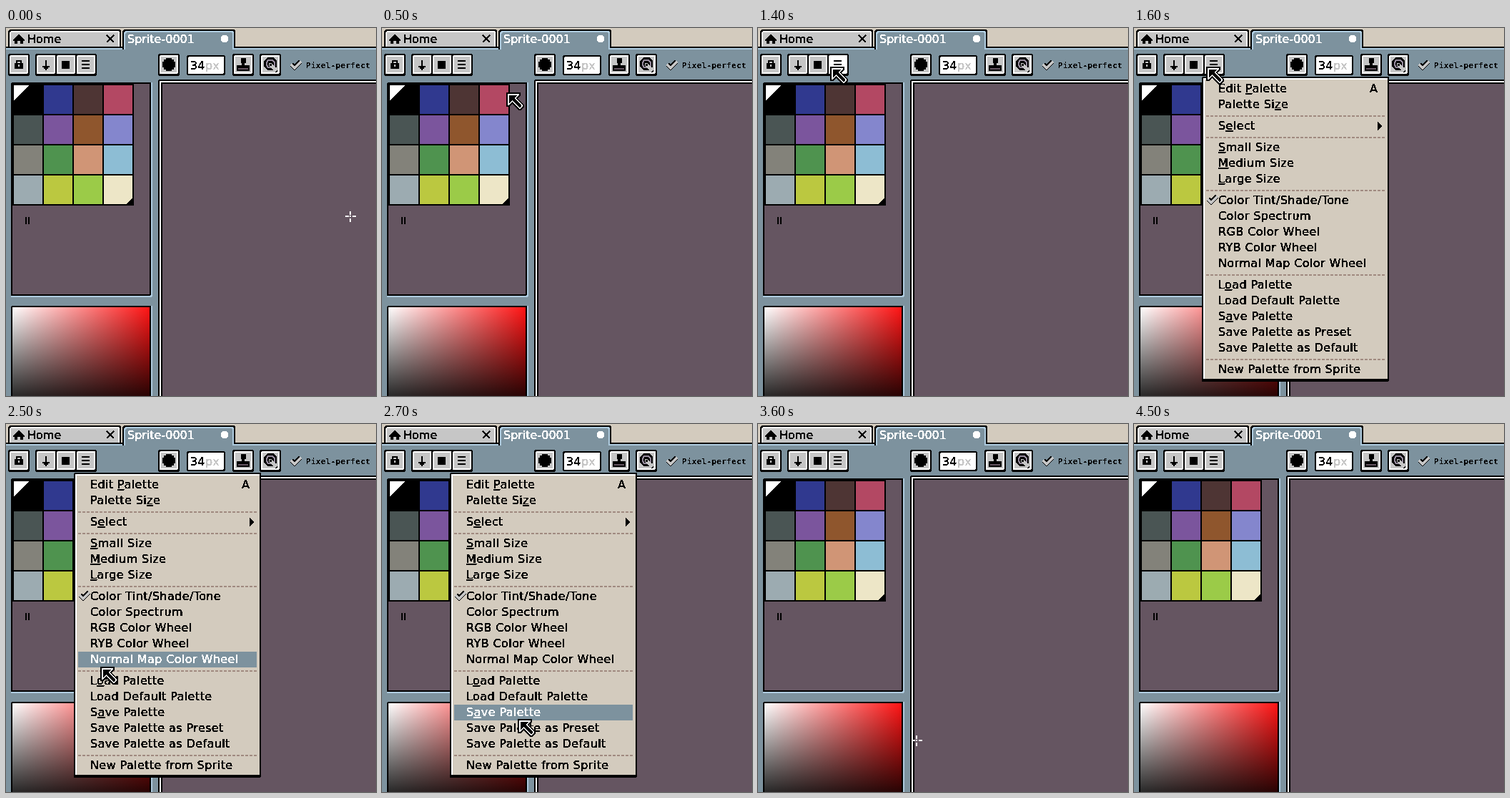
An HTML page that plays this animation: 518x514 px, repeating every 4900 ms.

```html
<!DOCTYPE html>
<html lang="en">
<head>
<meta charset="utf-8">
<title>Palette menu</title>
<style>
  html, body { margin: 0; width: 100%; height: 100%; overflow: hidden; background: #7d929e; }
  svg { display: block; width: 518px; height: 514px; shape-rendering: crispEdges; cursor: none; }
  text { font: 16px "DejaVu Sans", sans-serif; fill: #000; stroke: #000; stroke-width: .4px;
    white-space: pre; filter: url(#crisp); }
  .light { fill: #fff; stroke: #fff; }
  .dim { fill: #c6c6c6; stroke: #c6c6c6; }
  .row text { letter-spacing: .4px; }
  .row.on text { fill: #fff; stroke: #fff; }
  .row .bar { fill: none; }
  .row.on .bar { fill: #7d929e; }
  .u { text-decoration: underline; text-decoration-thickness: 2px; text-underline-offset: 2px; }
  .small { font: bold 11px "DejaVu Sans Mono", monospace; letter-spacing: .3px; stroke: none; }
  .face { fill: #c6c6c6; }
  .hover .face { fill: #fff; }
</style>
</head>
<body>
<svg viewBox="0 0 518 514">
  <defs>
    <linearGradient id="hue"><stop stop-color="#fff"/><stop offset="1" stop-color="#ff1414"/></linearGradient>
    <linearGradient id="shade" x2="0" y2="1"><stop stop-opacity="0"/><stop offset="1" stop-opacity=".88"/></linearGradient>
    <!-- hard, unsmoothed letter edges -->
    <filter id="crisp" x="-5%" y="-20%" width="110%" height="150%" color-interpolation-filters="sRGB">
      <feComponentTransfer><feFuncA type="discrete" tableValues="0 1"/></feComponentTransfer>
    </filter>
    <g id="check">
      <path d="M2 5l4 4 8-8" fill="none" stroke="#000" stroke-width="6"/>
      <path d="M1 5l5 5 9-9" fill="none" stroke="#c6c6c6" stroke-width="3"/>
    </g>
  </defs>
  <g id="ui"></g>
  <g id="menu"></g>
  <g id="cross">
    <path d="M-7 0h5M3 0h5M0 -7v5M0 3v5" stroke="#fff" stroke-width="2"/>
    <path d="M-1 -1h2v2h-2z" fill="#fff"/>
  </g>
  <g id="arrow">
    <path d="M0 0H20V4L16 8 25 18V20L20 25H18L8 16 4 20H0Z"/>
    <path d="M2 2H18V4L13 8 23 18V19L19 23H18L8 13 4 18H2Z" fill="#fff"/>
    <path d="M4 4H16L11 8 21 18V19L19 21H18L8 11 4 16Z"/>
  </g>
</svg>
<script>
const LOOP = 4900;
const $ = id => document.getElementById(id);
const rect = (x, y, w, h, fill, extra = "") =>
  `<rect x="${x}" y="${y}" width="${w}" height="${h}" fill="${fill}" ${extra}/>`;
const path = (d, fill = "#000", extra = "") => `<path d="${d}" fill="${fill}" ${extra}/>`;
const text = (x, y, s, extra = "") => `<text x="${x}" y="${y}" ${extra}>${s}</text>`;

const button = (x, icon, id = "") => `<g id="${id}" transform="translate(${x} 36)">
  ${rect(0, 0, 30, 31, "#000", 'rx="3"')}${rect(2, 2, 26, 26, "#fff", 'rx="2"')}
  ${rect(4, 4, 22, 22, "", 'class="face"')}<g transform="translate(1 1)">${icon}</g></g>`;

const ICONS = {
  lock: path("M8 12h2V8h8v4h2v8H8zM12 10v2h4v-2z", "#000", 'fill-rule="evenodd"') + rect(13, 14, 2, 3, "#c6c6c6"),
  down: path("M13 8h2v8h4v2h-2v2h-2v2h-2v-2h-2v-2H9v-2h4z"),
  square: rect(8, 9, 11, 11, "#000"),
  list: [8, 13, 18].map(y => rect(8, y, 11, 2, "#000")).join(""),
  brush: path("M10 5h8v2h3v3h2v8h-2v3h-3v2h-8v-2H7v-3H5v-8h2V7h3z"),
  stamp: path("M11 5h7v7h-2v3h7v8H5v-8h7v-3h-1z") + rect(7, 19, 14, 2, "#655561"),
  ink: path("M10 4h8l5 5v8l-2 3 3 3-2 2-4-3h-8l-5-5V9z") +
    path("M11 8h6l3 3v5l-3 2h-6l-2-3v-4z", "none", 'stroke="#958a9c" stroke-width="2"') +
    path("M12 12h4l8 9-3 3-9-8z", "#c6c6c6") + path("M13 13h3v3h-3z")
};

const SWATCHES = `000000 30398f 4e3534 b34863 4a5554 7b559d 8f562d 8486cd
  83827a 4f934f d09576 8dbdd4 9cabb1 bbc840 9bcb48 ede6c7`.split(/\s+/);

function drawUI() {
  const tabs = rect(0, 0, 518, 28, "#d3cbbe") +
    rect(0, 26, 518, 2, "#000") + rect(0, 28, 518, 2, "#aecbdf") +
    path("M3 26V4l2-2H159l2 2V26z") + path("M5 26V6l2-2H157l2 2V26z", "#fff") +
    rect(7, 6, 150, 20, "#c6c6c6") +
    path("M163 30V4l2-2H319l2 2V28h-2v2z") + path("M165 30V6l2-2H317l2 2V30z", "#aecbdf") +
    path("M167 32V8l2-2H315l2 2V32z", "#7d929e") +
    path("M10 16l8-7 8 7v2h-2v4h-4v-4h-4v4h-4v-4h-2z") +
    text(30, 21, "Home") + text(170, 21, "Sprite-0001", 'class="light"') +
    path("M141 10l10 10M151 10l-10 10", "none", 'stroke="#000" stroke-width="2"') +
    `<circle cx="306" cy="15" r="5.5" fill="#fff"/>`;

  const tools = button(3, ICONS.lock) + button(41, ICONS.down, "b0") +
    button(69, ICONS.square, "b1") + button(97, ICONS.list, "b2") +
    button(213, ICONS.brush) + button(317, ICONS.stamp) + button(355, ICONS.ink) +
    rect(253, 38, 54, 28, "#000", 'rx="3"') + rect(255, 40, 50, 24, "#fff", 'rx="2"') +
    text(258, 58, "34") + text(279, 58, "px", 'class="dim"') +
    `<use href="#check" x="398" y="46"/>` + text(420, 56, "Pixel-perfect", 'class="small"');

  const grid = SWATCHES.map((c, i) =>
    rect(11 + i % 4 * 42, 80 + (i >> 2) * 42, 40, 40, "#" + c)).join("");
  const palette = rect(7, 76, 198, 300, "#aecbdf", 'rx="2"') + rect(7, 76, 196, 298, "#000", 'rx="2"') +
    rect(9, 78, 192, 294, "#655561") + rect(9, 78, 170, 170, "#000") + grid +
    path("M11 80h21L11 101z", "#fff") + path("M179 235v13h-13z") +
    rect(27, 264, 2, 10, "#000") + rect(31, 264, 2, 10, "#000");

  const spectrum = rect(7, 388, 198, 140, "#aecbdf", 'rx="2"') + rect(7, 388, 196, 140, "#000", 'rx="2"') +
    rect(9, 390, 192, 130, "url(#hue)") + rect(9, 390, 192, 130, "url(#shade)");

  const canvas = rect(213, 72, 320, 460, "#000", 'rx="2"') +
    rect(215, 74, 320, 460, "#fff") + rect(217, 76, 320, 460, "#000") + rect(219, 78, 320, 460, "#655561");

  $("ui").innerHTML = rect(0, 0, 518, 514, "#7d929e") + tabs + tools + palette + spectrum + canvas;
}

// "_" marks the underlined letter; an empty entry is a separator.
const ITEMS = ["Edit _Palette", "Palette Si_ze", "", "S_elect", "", "_Small Size", "_Medium Size",
  "_Large Size", "", "Color Tint/Shade/Tone", "Color Spectrum", "RGB Color Wheel", "RYB Color Wheel",
  "Normal Map Color Wheel", "", "L_oad Palette", "Load Default Palette", "S_ave Palette",
  "Save Palette as Preset", "Save Palette as Default", "", "New Palette from Sprite"];
const rows = [];

function drawMenu() {
  let top = 74, html = rect(95, 68, 262, 426, "#000", 'rx="2"') +
    rect(97, 70, 258, 420, "#fff") + rect(99, 72, 256, 418, "#d3cbbe");
  for (const item of ITEMS) {
    if (!item) {
      html += path(`M101 ${top + 5}H351`, "none", 'stroke="#a08a80" stroke-width="2" stroke-dasharray="4 2"');
      top += 8;
      continue;
    }
    const label = item.replace(/_(.)/, '<tspan class="u">$1</tspan>');
    html += `<g class="row">${rect(101, top, 250, 22, "", 'class="bar"')}${text(118, top + 16, label)}`;
    if (item.startsWith("Edit")) html += text(330, top + 16, "A");
    if (item === "S_elect") html += path(`M341 ${top + 5}l7 6-7 6z`);
    if (item.includes("Tint")) html += `<use href="#check" x="102" y="${top + 4}"/>`;
    html += "</g>";
    rows.push(top);
    top += 22;
  }
  $("menu").innerHTML = html;
}

// time, pointer x, pointer y
const STEPS = [
  [0, 482, 263], [100, 454, 243], [200, 386, 202], [300, 303, 153], [400, 234, 112],
  [500, 174, 90], [600, 143, 82], [700, 126, 24], [800, 110, 4], [900, 102, 50],
  [1000, 93, 53], [1100, 82, 52], [1300, 89, 52], [1400, 101, 54],
  [2200, 95, 92], [2300, 87, 165], [2400, 102, 258], [2500, 132, 339], [2600, 158, 384],
  [2700, 190, 412], [2800, 216, 441], [3000, 219, 442], [3100, 222, 441], [3600, 222, 442],
  [4100, 200, 376], [4200, 148, 236], [4300, 92, 112], [4400, 60, 40], [4500, -60, -60]
];

function render(t) {
  const [, x, y] = STEPS.findLast(step => step[0] <= t);
  const open = t >= 1600 && t < 3600;
  const drawing = !open && x > 214 && y > 76;
  const show = (id, on) => $(id).setAttribute("visibility", on ? "visible" : "hidden");
  show("menu", open);
  show("cross", drawing);
  show("arrow", !drawing);
  $(drawing ? "cross" : "arrow").setAttribute("transform", `translate(${x} ${y})`);

  [42, 70, 98].forEach((left, i) =>
    $("b" + i).classList.toggle("hover", !open && y > 37 && y < 66 && x >= left && x < left + 28));
  document.querySelectorAll(".row").forEach((row, i) =>
    row.classList.toggle("on", open && t >= 2200 && x > 99 && y >= rows[i] && y < rows[i] + 22));
}

drawUI();
drawMenu();
const start = performance.now();
function tick() {
  render((performance.now() - start) % LOOP);
  requestAnimationFrame(tick);
}
render(0);
requestAnimationFrame(tick);
</script>
</body>
</html>
```
